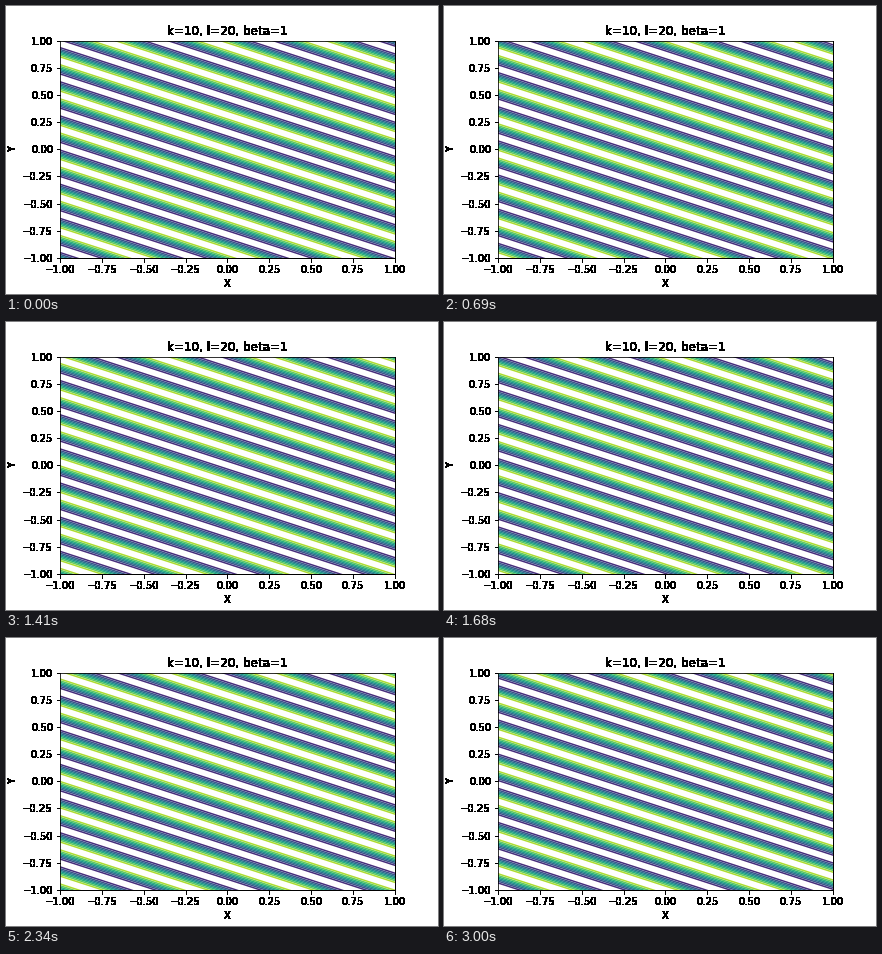
Animation, 432 px wide and 288 px high, one loop 3.03 s. Source, as a matplotlib script:

```python
import numpy as np
import matplotlib.pyplot as plt
from matplotlib.animation import FuncAnimation
from matplotlib.collections import LineCollection

K, L, BETA = 10, 20, 1
OMEGA = -BETA * K / (K**2 + L**2)   # Rossby wave dispersion relation
DT = 10
FRAMES, INTERVAL = 101, 30

LEVELS = np.linspace(-0.75, 0.75, 7)
WAVES = 2 * np.pi * np.arange(-8, 9)
EDGES = np.array([-1.1, 1.1])


def solid_black(image, dpi):
    """Turn every touched pixel fully black, for hard-edged text."""
    out = np.zeros_like(image)
    out[..., 3] = image[..., 3] > 0
    return out, 0, 0


# Phases where cos(phase) equals each level, ordered from low to high level
phases = np.concatenate(
    [np.concatenate([WAVES - np.arccos(c), WAVES + np.arccos(c)]) for c in LEVELS])
colors = np.repeat(plt.cm.viridis((LEVELS + 1) / 2), 2 * len(WAVES), axis=0)


def crests(t):
    """Lines of constant phase K*x + L*y - OMEGA*t."""
    shift = (OMEGA * t) % (2 * np.pi)
    y = (phases[:, None] + shift - K * EDGES) / L
    x = np.broadcast_to(EDGES, y.shape)
    return np.stack([x, y], axis=-1)


fig, ax = plt.subplots(figsize=(6, 4), dpi=72, facecolor="white")
fig.subplots_adjust(left=0.125, right=0.9, bottom=0.125, top=0.88)

ticks = np.linspace(-1, 1, 9)
ax.set(xlim=(-1, 1), ylim=(-1, 1), xticks=ticks, yticks=ticks,
       xlabel="X", ylabel="Y")
ax.xaxis.set_major_formatter("{x:.2f}")
ax.yaxis.set_major_formatter("{x:.2f}")
ax.set_title(f"k={K}, l={L}, beta={BETA}")

for part in (ax.title, ax.xaxis, ax.yaxis, ax.spines["right"], ax.spines["bottom"]):
    part.set_agg_filter(solid_black)

lines = LineCollection(crests(0), colors=colors, linewidths=1.5, zorder=2)
ax.add_collection(lines, autolim=False)


def update(frame):
    lines.set_segments(crests(frame * DT))
    return [lines]


anim = FuncAnimation(fig, update, frames=FRAMES, interval=INTERVAL,
                     repeat=True, repeat_delay=0, blit=False)
plt.show()
```
